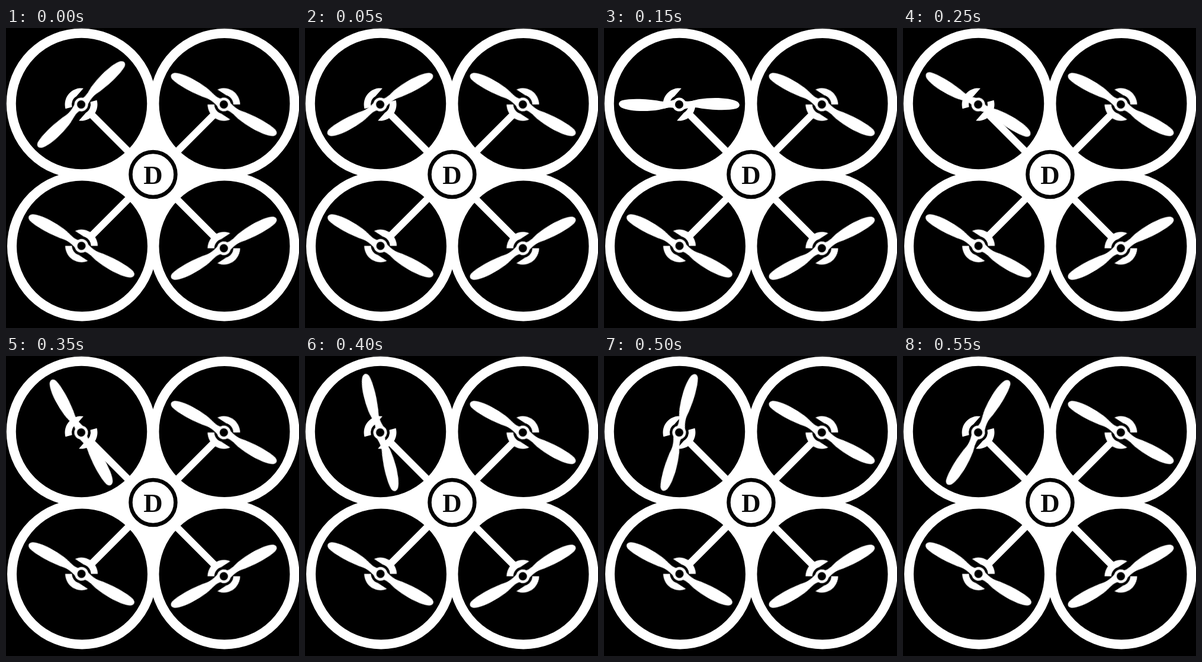
An HTML page that plays this animation: 495 by 506 pixels, repeating every 600 ms.

```html
<!DOCTYPE html>
<html lang="en">
<head>
<meta charset="utf-8">
<title>Quadcopter</title>
<style>
  html, body { margin: 0; width: 100%; height: 100%; overflow: hidden; background: #000; }
  svg { display: block; width: 495px; height: 506px; }
  text { font: bold 45px "Liberation Serif", "Times New Roman", serif; text-anchor: middle; }
  .spin { animation: spin 600ms steps(12, end) infinite; }
  @keyframes spin {
    from { transform: rotate(-45deg); }
    to { transform: rotate(135deg); }
  }
</style>
</head>
<body>
<svg viewBox="0 0 495 506" fill="#fff">
  <defs>
    <path id="blade" d="M8,-6 C18,-4 24,-7 34,-9 C58,-13 88,-11 98,-5 C104,-1 103,5 96,7 C80,11 50,9 34,6 C24,4 18,5 8,8 Z"/>
    <g id="prop">
      <use href="#blade"/>
      <use href="#blade" transform="rotate(180)"/>
      <circle r="11.5"/>
      <circle r="7" fill="#000"/>
    </g>
    <path id="arc" d="M-23.8,-13.7 A27.5,27.5 0 0 1 22,-16.6 L4.1,-15.5 A16,16 0 0 0 -13.9,-8 Z"/>
    <g id="mount">
      <use href="#arc"/>
      <use href="#arc" transform="rotate(180)"/>
    </g>
    <g id="rotor">
      <use href="#mount"/>
      <use href="#prop"/>
    </g>
  </defs>

  <!-- frame -->
  <rect x="128" y="128" width="241" height="240"/>
  <g stroke="#fff" stroke-width="16" fill="#000">
    <circle cx="127.5" cy="127.5" r="118.75"/>
    <circle cx="369" cy="127.5" r="118.5"/>
    <circle cx="128.5" cy="368" r="118.5"/>
    <circle cx="369" cy="368" r="118.5"/>
  </g>
  <path d="M142,143.5 L210,211.5 M352,145.5 L284,213.5 M146,349 L212,283 M352,352 L284,284" stroke="#fff" stroke-width="12"/>

  <!-- badge -->
  <circle cx="248.5" cy="247" r="38" stroke="#000" stroke-width="6.5"/>
  <text x="248.5" y="262.5" fill="#0a0a0a">D</text>

  <!-- rotors: neighbours are mirror images -->
  <g transform="translate(127 129)">
    <use href="#mount" transform="rotate(-45)"/>
    <g class="spin"><use href="#prop"/></g>
  </g>
  <use href="#rotor" transform="translate(368 129) rotate(30) scale(1 -1)"/>
  <use href="#rotor" transform="translate(127.5 367.5) rotate(30) scale(1 -1)"/>
  <use href="#rotor" transform="translate(368 371.5) rotate(-30)"/>
</svg>
</body>
</html>
```
